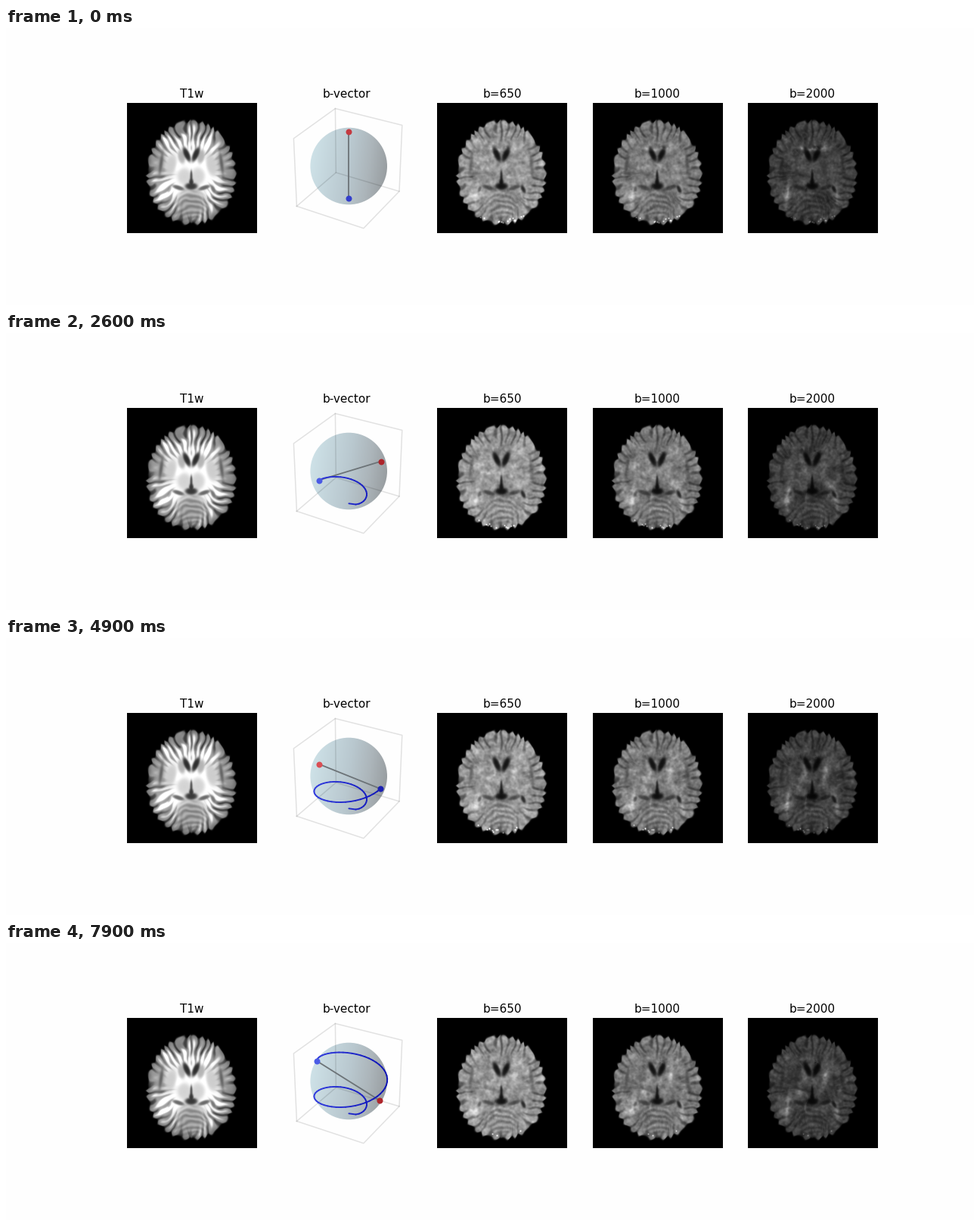
A matplotlib script that plays this animation: 1280 by 366 pixels, repeating every 8000 ms.

```python
import numpy as np
import matplotlib.pyplot as plt
from matplotlib.animation import FuncAnimation
from matplotlib.collections import LineCollection
from matplotlib.patches import Circle

W, H, DPI = 1280, 366, 100
PX = 72 / DPI                    # points per pixel
STEPS, TURN = 80, np.radians(7.2)
LEFT, PITCH, TOP, SIZE = 160, 205.24, 99.2, 171.8
CX, CY, R, DIST = 453.4, 182.5, 50.8, 910

fig = plt.figure(figsize=(W / DPI, H / DPI), dpi=DPI, facecolor="#fefefe")
ax = fig.add_axes([0, 0, 1, 1])
ax.axis("off")

# ---------- brain slice, in panel pixels ----------
N = 172
U, V = np.meshgrid(np.arange(N) + 0.5, np.arange(N) + 0.5)
MID = 85
rng = np.random.default_rng(12)
freq = np.hypot(*np.meshgrid(np.fft.fftfreq(N), np.fft.fftfreq(N)))


def blur(img, sigma):
    kernel = np.exp(-2 * (np.pi * sigma * freq) ** 2)
    return np.fft.ifft2(np.fft.fft2(img) * kernel).real


def noise(sigma, gen=rng):
    n = blur(gen.standard_normal((N, N)), sigma)
    return n / n.std()


def soft(d, width):
    return 1 / (1 + np.exp(-np.clip(d / width, -40, 40)))


def blob(cx, cy, rx, ry, tilt=0, edge=0.15):
    c, s = np.cos(np.radians(tilt)), np.sin(np.radians(tilt))
    dx, dy = U - cx, V - cy
    d = np.hypot((dx * c + dy * s) / rx, (dy * c - dx * s) / ry)
    return soft(1 - d, edge)


def pair(dx, cy, rx, ry, tilt=0, edge=0.15):
    left = blob(MID - dx, cy, rx, ry, -tilt, edge)
    return np.maximum(left, blob(MID + dx, cy, rx, ry, tilt, edge))


def paint(img, mask, value):
    img += (value - img) * mask


y = (V - 92) / 69.5
x = (U - MID) / 59.5 / (1 + 0.04 * y)
r = np.hypot(x, y)
theta = np.abs(np.arctan2(x, -y))
rough = noise(4)
fold = np.cos(32 * theta + 1.7 * noise(8) + 0.5 * rough)
mask = soft(1 - 0.025 * (1 - fold) - r, 0.008)
white = soft(0.67 + 0.19 * fold + 0.05 * rough - r, 0.03)
sulcus = np.clip((-fold - 0.3) / 0.6, 0, 1) * np.clip((r - 0.68 - 0.05 * rough) / 0.1, 0, 1)

wiggle = MID + 0.8 * np.sin(V / 5)
gap = np.exp(-((U - wiggle) / 1.5) ** 2) * (soft(50 - V, 2) + soft(V - 150, 2))
horns = pair(6, 68, 3.6, 10, 24)
third = blob(MID, 97, 1.5, 8)
cistern = np.maximum(blob(MID, 110, 8, 4.5), blob(MID, 106, 3, 6))
wings = pair(17, 112, 8, 2.6, -18)
insula = pair(40, 80, 2, 13, -8, 0.3)
vermis = blob(MID, 134, 20, 19)
leaves = np.cos(2 * np.pi * (V - 0.022 * (U - MID) ** 2 + rough) / 7)
rear_horn = np.maximum(blob(114, 114, 2.4, 5.5, -25), 0.6 * blob(56, 114, 2, 4, 25))


def t1_slice():
    img = 152 + 108 * white - 85 * sulcus + 7 * rough
    img -= 30 * soft(r - 0.93, 0.02)
    paint(img, pair(41, 80, 8, 17, -8, 0.3), 160)
    paint(img, insula, 95)
    paint(img, pair(27, 82, 7, 15, -12), 205)
    paint(img, pair(13, 71, 4.5, 9, 12), 180)
    paint(img, pair(9, 97, 9, 11), 212)
    paint(img, vermis, 150 + 26 * leaves)
    for part, value in ((horns, 45), (third, 80), (wings, 105),
                        (cistern, 55), (rear_horn, 120), (gap, 85)):
        paint(img, part, value)
    return np.clip(blur(img, 0.6) * mask, 0, 255)


def diffusion_base():
    img = 1.04 - 0.08 * white - 0.42 * sulcus + 0.05 * rough + 0.07 * noise(1.6)
    paint(img, vermis, 0.92 + 0.2 * leaves)
    for part, value in ((insula, 0.65), (wings, 0.5), (horns, 0.14), (third, 0.2),
                        (cistern, 0.12), (rear_horn, 0.22), (gap, 0.45)):
        paint(img, part, value)
    return blur(img, 0.8) * mask


def unit(v):
    v = np.asarray(v, float)
    return v / np.sqrt((v ** 2).sum(axis=0))


arc = V - 61 + 0.03 * np.minimum(np.abs(U - MID), 16) ** 2 - 0.35 * np.abs(U - MID)
genu = np.exp(-(arc / 2.6) ** 2) * soft(18 - np.abs(U - MID), 1.5)
tracts = [                       # region, fibre direction, strength
    (genu, (1, 0.1, 0), 0.9),
    (blob(73, 75, 3, 10, -12, 0.4), (-0.3, 0.5, 0.8), 0.9),
    (blob(103, 75, 3, 10, 16, 0.4), (0.3, 0.5, 0.8), 0.9),
    (blob(68, 96, 4, 8, 15, 0.4), (0.4, 0.1, 0.9), 0.8),
    (blob(104, 97, 4, 8, -15, 0.4), (-0.4, 0.1, 0.9), 0.8),
    (blob(53, 117, 3, 16, 8, 0.4), (0.1, 1, 0.2), 1.0),
    (blob(116, 120, 3, 16, -12, 0.4), (-0.1, 1, 0.1), 1.0),
]
tracts = [(m, unit(d), k) for m, d, k in tracts]
fibres = unit([noise(7) for _ in range(3)])
base = diffusion_base()
rim = (r > 0.9) & (r < 0.97) & (V > 148)
SHELLS = ((650, 152, 0.25), (1000, 124, 0.42), (2000, 66, 0.8))


def diffusion(g, step):
    gen = np.random.default_rng(100 + step)
    cos2 = np.tensordot(g, fibres, 1) ** 2
    bright = 0.6 * (0.35 + 0.65 * white) * (1 / 3 - cos2)
    for region, d, k in tracts:
        bright = bright + k * region * (0.85 - 1.3 * (g @ d) ** 2)
    specks = blur(rim * (gen.random((N, N)) > 0.975), 0.7) * 3
    for _, level, gain in SHELLS:
        grain = 1 + (0.03 + 0.05 * gain) * noise(1.1, gen)
        img = level * base * np.exp(gain * bright) * grain + 0.9 * level * specks
        yield np.clip(img, 0, 255)


# ---------- direction sphere ----------
def project(p):
    """Perspective view, elevation 30 and azimuth -60 degrees."""
    px, py, pz = np.asarray(p, float) * R
    c = np.sqrt(3) / 2
    right = c * px + 0.5 * py
    up = -0.25 * px + c / 2 * py + c * pz
    near = c / 2 * px - 0.75 * py + 0.5 * pz
    scale = DIST / (DIST - near)
    return np.array([CX + right * scale, CY - up * scale])


def direction(step):
    z = -1 + step / 50
    s = np.sqrt(1 - z * z)
    return np.array([s * np.cos(TURN * step), s * np.sin(TURN * step), z])


def shade(px, light, dark):
    t = np.clip((px - CX) / R / 2 + 0.5, 0, 1)
    return (np.array(light) * (1 - t) + np.array(dark) * t) / 255


BLUE = (80, 98, 236), (22, 26, 172)
RED = (224, 84, 90), (168, 32, 38)
TRAIL = (52, 62, 224), (12, 18, 182)

gx, gy = np.meshgrid(np.linspace(-1, 1, 104), np.linspace(-1, 1, 104))
tone = np.clip(0.95 * gx + 0.14 * gy, -1, 1)
ball = np.stack([np.interp(tone, (-1, 0, 0.5, 1), c) for c in
                 ((207, 185, 172, 150), (227, 200, 181, 155), (233, 207, 186, 158))], -1) / 255
sphere = ax.imshow(ball, extent=(CX - 52, CX + 52, CY + 52, CY - 52), aspect="auto", zorder=1)
sphere.set_clip_path(Circle((CX - 0.2, CY), R, transform=ax.transData))

K = 51 / R
cube = [[(-1, -1, -1), (-1, -1, 1), (-1, 1, 1), (1, 1, 1), (1, 1, -1), (1, -1, -1), (-1, -1, -1)],
        [(-1, 1, 1), (-1, 1, -1), (-1, -1, -1)],
        [(-1, 1, -1), (1, 1, -1)]]
for path in cube:
    ax.plot(*project(K * np.array(path).T), color="black", alpha=0.115,
            lw=1.5 * PX, solid_joinstyle="round", zorder=2)

path = project(np.array([direction(i) for i in range(STEPS)]).T).T
links = np.stack([path[:-1], path[1:]], 1)
link_colors = [shade(s[:, 0].mean(), *TRAIL) for s in links]
trail = LineCollection([], linewidths=1.9 * PX, capstyle="round", zorder=4)
ax.add_collection(trail)
rod, = ax.plot([], [], color="#6c7377", lw=1.8 * PX, zorder=3)
dots = [ax.plot([], [], "o", ms=8 * PX, mew=0, zorder=5)[0] for _ in range(2)]


# ---------- panels ----------
def panel(col, img):
    left = LEFT + PITCH * col
    return ax.imshow(img, cmap="gray", vmin=0, vmax=255, aspect="auto",
                     extent=(left, left + SIZE, TOP + SIZE, TOP))


panel(0, t1_slice())
scans = [panel(i, np.zeros((N, N))) for i in (2, 3, 4)]
titles = ["T1w", "b-vector"] + [f"b={b}" for b, _, _ in SHELLS]
for i, title in enumerate(titles):
    ax.text(LEFT + PITCH * i + 85.5, 91.6, title, ha="center", va="baseline",
            family="DejaVu Sans", size=15.24 * PX)
ax.set_xlim(0, W)
ax.set_ylim(H, 0)


def draw(step):
    g = direction(step)
    ends = project(g), project(-g)
    rod.set_data(*zip(*ends))
    for dot, (px, py), tint in zip(dots, ends, (BLUE, RED)):
        dot.set_data([px], [py])
        dot.set_markerfacecolor(shade(px, *tint))
    trail.set_segments(links[:step])
    trail.set_color(link_colors[:step])
    for scan, img in zip(scans, diffusion(g, step)):
        scan.set_data(img)
    return [rod, trail, *dots, *scans]


anim = FuncAnimation(fig, draw, frames=STEPS, interval=100, repeat=True)
plt.show()
```
